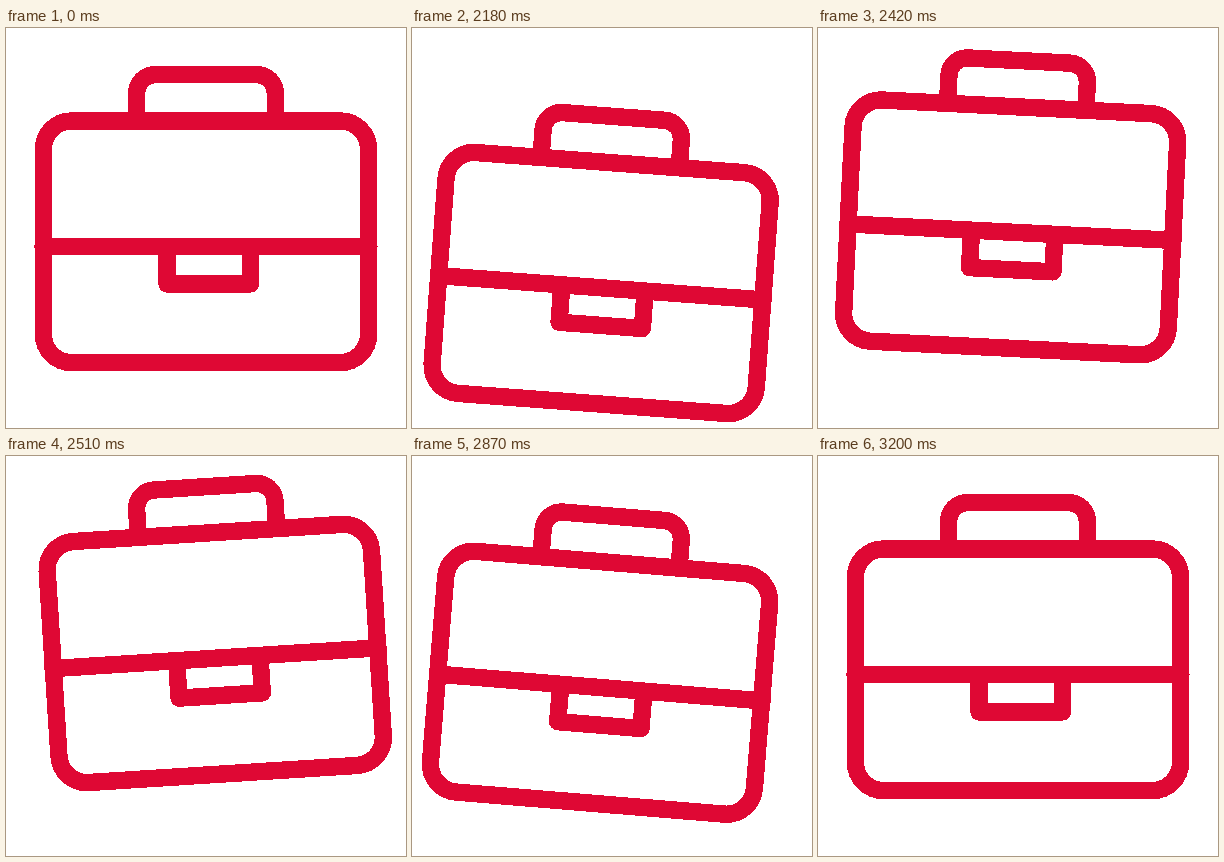
Animation, 400 px wide and 400 px high, one loop 3.23 s. Source, as an HTML page:

```html
<!DOCTYPE html>
<html lang="en">
<head>
<meta charset="utf-8">
<title>Swinging briefcase</title>
<style>
  html, body { margin: 0; width: 100%; height: 100%; overflow: hidden; background: #fff; }
  svg { display: block; width: 100%; height: 100%; }
</style>
</head>
<body>
<svg viewBox="0 0 400 400" shape-rendering="crispEdges">
  <g id="bag" fill="none" stroke="#df0834" stroke-width="17.4" stroke-linecap="round" stroke-linejoin="round">
    <rect x="37.5" y="93" width="325" height="241.5" rx="28"/>
    <path d="M130.7 93V65a18.3 18.3 0 0 1 18.3-18.3H251a18.3 18.3 0 0 1 18.3 18.3V93"/>
    <path d="M37 218.5H363"/>
    <path d="M161 218.5V256H244.5V218.5"/>
  </g>
</svg>
<script>
  const LOOP = 3230, START = 2000, STEP = 30;
  // Turning points: [step, value]
  const SWING = [[0, 0], [10.5, 7], [20, -6.75], [30.5, 5.3], [40, 0]];
  const BOUNCE = [[0, 0], [5, 43], [15.6, -17.5], [26, 17], [36, 0]];
  const bag = document.getElementById('bag');

  // Sine ease between neighbouring turning points
  function valueAt(points, k) {
    const i = points.findIndex(p => p[0] > k);
    if (i < 1) return 0;
    const [k0, v0] = points[i - 1], [k1, v1] = points[i];
    const ease = (1 - Math.cos(Math.PI * (k - k0) / (k1 - k0))) / 2;
    return v0 + (v1 - v0) * ease;
  }

  function draw() {
    const time = performance.now() % LOOP;
    const k = Math.max(0, Math.floor((time - START) / STEP));
    const y = valueAt(BOUNCE, k), angle = valueAt(SWING, k);
    bag.setAttribute('transform', `translate(0 ${y}) rotate(${angle} 200 68)`);
    requestAnimationFrame(draw);
  }
  draw();
</script>
</body>
</html>
```
